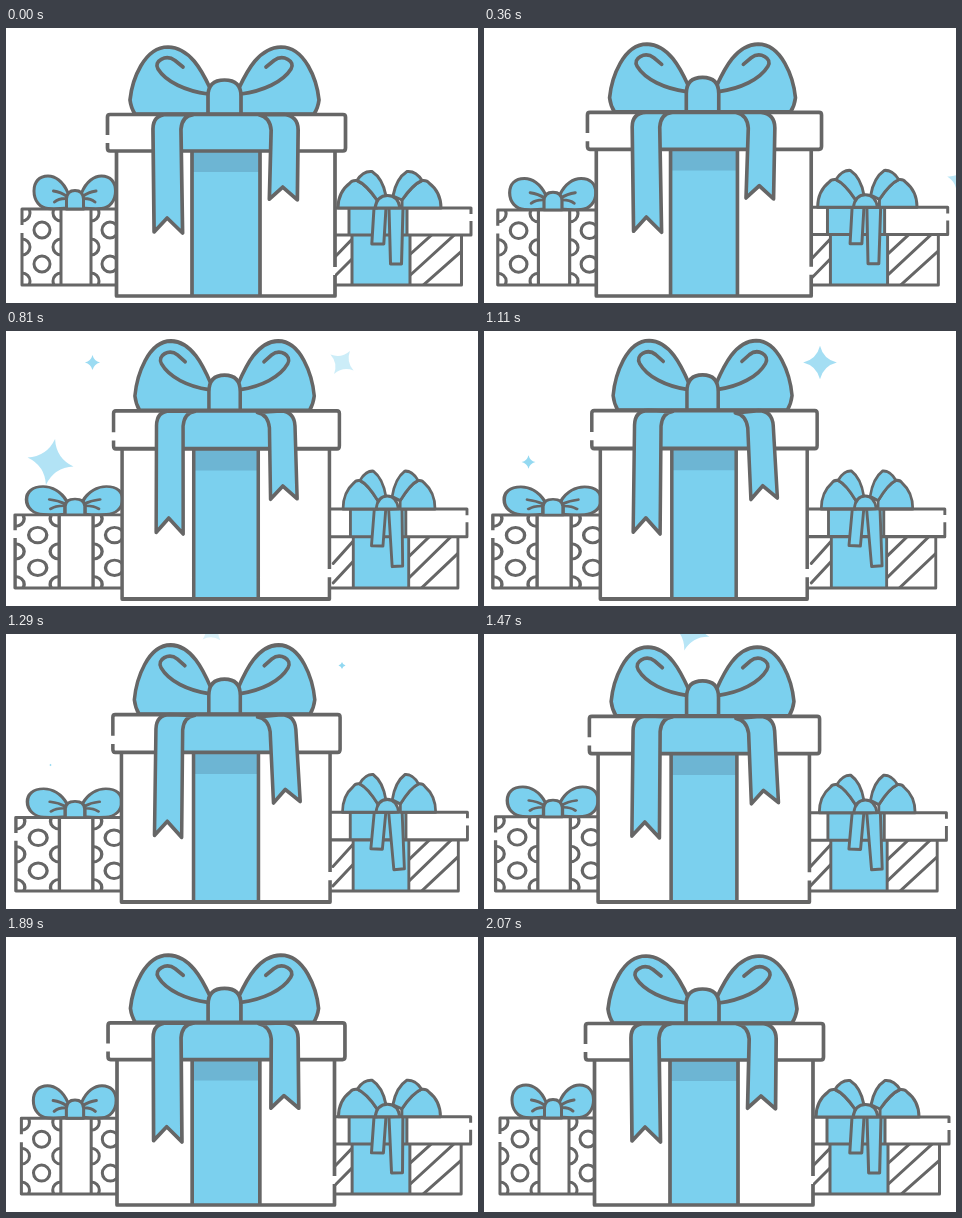
Animation of 472 by 275 pixels, one loop 2100 ms. Source, as an HTML page:

```html
<!DOCTYPE html>
<html lang="en">
<head>
<meta charset="utf-8">
<title>Gifts</title>
<style>
  html, body { margin: 0; width: 100%; height: 100%; overflow: hidden; background: #fff; }
  svg { display: block; width: 472px; height: 275px; }
  .ink { stroke: #666; fill: none; stroke-linejoin: round; stroke-linecap: round; }
  .white { fill: #fff; }
  .blue { fill: #7bd0ee; }
  .bare { stroke: none; }
  .butt { stroke-linecap: butt; }
</style>
</head>
<body>
<svg viewBox="0 0 472 275">
  <defs>
    <clipPath id="dotArea"><path d="M16 181H55V257H16ZM85 181H122V257H85Z"/></clipPath>
    <clipPath id="stripeArea"><path d="M310 207H346V257H310ZM404 207H455V257H404Z"/></clipPath>
  </defs>
  <g id="stars" fill="#7bd0ee"></g>

  <g id="left" class="ink" stroke-width="3">
    <path class="white bare" d="M16 181H122V257H16Z"/>
    <g id="dots" clip-path="url(#dotArea)"></g>
    <path class="butt" d="M16 197V181H122M16 205V257H122M55 181V257M85 181V257"/>
    <g id="leftBow">
      <g id="leftLoop">
        <path class="blue" d="M62 165C57 153 49 148 42 148C33 148 28 154 28 163C28 173 34 180 42 180.500Q50 181 62 180Z"/>
        <path d="M47.500 163Q55 164 61 168.500M48.500 174Q53 170 61 170.500"/>
      </g>
      <use href="#leftLoop" transform="matrix(-1 0 0 1 137.500 0)"/>
      <path class="blue" d="M60.500 181V171Q61 162.500 69 162.500Q77 162.500 77.500 171V181Z"/>
    </g>
  </g>

  <g id="right" class="ink" stroke-width="3">
    <path class="white bare" d="M310 180H465V207H455V257H310Z"/>
    <path class="blue bare" d="M343 180H401V207H404V257H346V207H343Z"/>
    <path clip-path="url(#stripeArea)" d="M325 233L353 204M325 252L353 224M400 230L430 203M400 251L457 199M414 260L457 222"/>
    <path class="butt" d="M310 257H455.500V207M346 207V257M404 207V257M343 180V207M401 180V207M310 180H465V186M465 193V207H310"/>
    <path id="tagA" class="blue" d="M368 180L366 216H378L380 180Z"/>
    <path id="tagB" class="blue" d="M383 180L384 236H395L397 180Z"/>
    <g id="rightBow">
      <g id="rightLoop">
        <path class="blue" d="M371 172C364 162 357 155 351 152.500Q346 152 344 155C336 161 332 170 332 180H371Z"/>
        <path class="blue" d="M371 172C364 162 357 155 351 152.500C355 146 361 143 366 143.500C373 148 378 157 380 168Z"/>
      </g>
      <use href="#rightLoop" transform="matrix(-1 0 0 1 767 0)"/>
      <path class="blue" d="M369 180Q371 167.500 381.500 167.500Q392 167.500 394 180Z"/>
    </g>
  </g>

  <g id="big" class="ink" stroke-width="3.700">
    <path class="white bare" d="M110.500 123H329V268H110.500Z"/>
    <path class="blue bare" d="M186 123H254V268H186Z"/>
    <path class="bare" style="fill:#6db5d3" d="M186 123H254V144H186Z"/>
    <path class="butt" d="M186 123V268M254 123V268M329 239V123M110.500 123V268H329V247"/>
    <g id="bigLoop">
      <path class="blue" d="M203 86H129Q125 80 124 72C126 52 138 19 162 19C184 19.500 196 43 204 60Z"/>
      <path d="M177 39L169 32.500C160 26 147 33 152 41C160 54 180 63 202 66"/>
    </g>
    <use href="#bigLoop" transform="matrix(-1 0 0 1 437 0)"/>
    <path class="blue" d="M202 86V68Q202 52 218.500 52Q235 52 235 68V86Z"/>
    <path class="white bare" d="M101.500 86.500H339.500V123H101.500Z"/>
    <path class="blue bare" d="M174 86.500H266V123H174Z"/>
    <path class="butt" d="M101.500 107V89Q101.500 86.500 104 86.500H337Q339.500 86.500 339.500 89V120Q339.500 123 337 123H104Q101.500 123 101.500 120V115"/>
    <path id="tailA" class="blue" d="M187 86.500H161Q147 87 147 101L148.500 204L161.500 190L177 205L175 101Q176 88 187 86.500"/>
    <path id="tailB" class="blue" d="M253 86.500H278Q292 88 292 102L290.500 172L276 159L262.500 171L265 102Q264 89 253 86.500"/>
  </g>
</svg>
<script>
const LOOP = 2100, PEAK = 980, LAG = 250;
const $ = id => document.getElementById(id);

function add(parent, tag, attrs) {
  const el = document.createElementNS('http://www.w3.org/2000/svg', tag);
  for (const key in attrs) el.setAttribute(key, attrs[key]);
  return parent.appendChild(el);
}

// staggered dot pattern
function addDots(columns, rows) {
  for (const cx of columns)
    for (const cy of rows) add($('dots'), 'circle', { cx, cy, r: 8 });
}
addDots([16, 55, 85], [185, 219, 253]);
addDots([36, 104], [202, 236]);

// x, y, radius, start, peak, end
const stars = [
  [86.5, 31.5, 16, 350, 700, 1130],
  [44.5, 131, 24, 450, 870, 1480],
  [336, 31.5, 18, 430, 1100, 1500],
  [206, -3, 21.5, 1110, 1565, 1730],
  [477, 153, 15.5, 100, 440, 720]
].map(spec => ({
  spec,
  el: add($('stars'), 'path', { d: 'M0-1Q.2-.2 1 0Q.2.2 0 1Q-.2.2-1 0Q-.2-.2 0-1Z' })
}));

const clamp = v => Math.min(1, Math.max(0, v));

function drawStar({ spec: [x, y, r, start, peak, end], el }, t) {
  const rise = clamp((t - start) / (peak - start));
  const fall = clamp((t - peak) / (end - peak));
  const size = r * Math.sin(rise * Math.PI / 2) * (1 - fall) ** 2.5;
  el.setAttribute('transform', `translate(${x} ${y}) rotate(${80 * (1 - rise)}) scale(${size})`);
  el.setAttribute('opacity', 0.68 * rise + 0.32 * fall);
}

function stretch(id, x, y, sx, sy) {
  $(id).setAttribute('transform', `translate(${x} ${y}) scale(${sx} ${sy}) translate(${-x} ${-y})`);
}

function swing(id, angle, x, y) {
  $(id).setAttribute('transform', `rotate(${angle} ${x} ${y})`);
}

// eases 0 to 1 at PEAK and back to 0 at LOOP
function wave(t) {
  const part = t < PEAK ? t / PEAK : (LOOP - t) / (LOOP - PEAK);
  return (1 - Math.cos(Math.PI * part)) / 2;
}

function draw(t) {
  const k = wave(t);
  const s = wave((t - LAG + LOOP) % LOOP); // ribbons trail behind the boxes
  stretch('big', 220, 268, 1 - 0.055 * k, 1 + 0.039 * k);
  swing('tailA', 1.7 * s, 165, 88);
  swing('tailB', -5 * s, 278, 88);
  stretch('left', 69, 257, 1 + 0.14 * k, 1 - 0.04 * k);
  stretch('leftBow', 69, 181, 1 + 0.05 * k, 1 - 0.12 * k);
  stretch('right', 375, 257, 1 - 0.048 * k, 1 + 0.028 * k);
  stretch('rightBow', 382, 180, 1 - 0.07 * k, 1 + 0.01 * k);
  swing('tagA', 2.5 * s, 374, 180);
  swing('tagB', -4.5 * s, 388, 180);
  stars.forEach(star => drawStar(star, t));
}

const begin = performance.now();
function frame() {
  draw((performance.now() - begin) % LOOP);
  requestAnimationFrame(frame);
}
frame();
</script>
</body>
</html>
```
